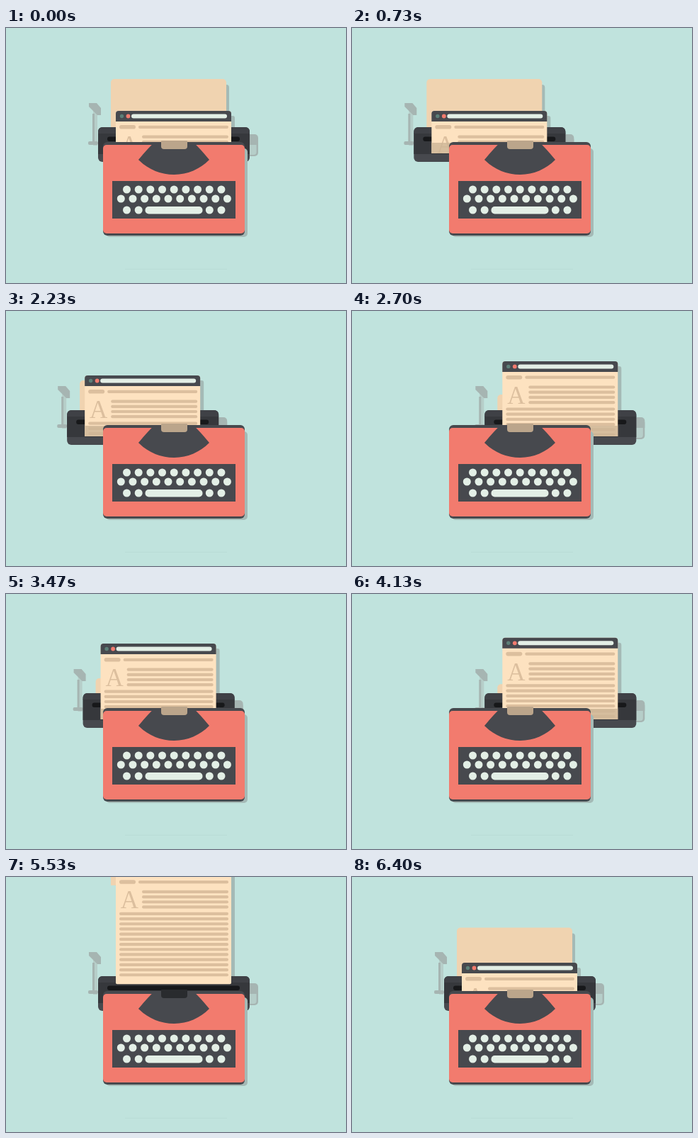
Animation of 480x360 px, one loop 6430 ms. Source, as an HTML page with a canvas:

```html
<!DOCTYPE html>
<html lang="en">
<head>
<meta charset="utf-8">
<title>Typewriter</title>
<style>
  html, body { margin: 0; width: 100%; height: 100%; overflow: hidden; background: #c0e3dd; }
  canvas { display: block; width: 480px; height: 360px; }
</style>
</head>
<body>
<canvas id="stage"></canvas>
<script>
const LOOP = 6430;
const REACH = 57.3;      // carriage travel to each side
const SHEET = 167;       // sheet height
const COL = {
  bg: '#c0e3dd', shadow: '#a4bab6', dark: '#47494e', deep: '#36383c',
  slot: '#17181a', red: '#f27b6e', key: '#e3efe6', front: '#fde2c0',
  back: '#f0d3b0', ink: '#dcbf9e', shade: '#cdb697', clip: '#bba58b',
  steel: '#a6b5b2', pale: '#b6cec9'
};

const canvas = document.getElementById('stage');
const ctx = canvas.getContext('2d');
const dpr = window.devicePixelRatio || 1;
canvas.width = 480 * dpr;
canvas.height = 360 * dpr;

const clamp = v => Math.max(0, Math.min(1, v));
const part = (t, a, b) => clamp((t - a) / (b - a));
const sine = u => 0.5 - 0.5 * Math.cos(Math.PI * u);
const lerp = (a, b, u) => a + (b - a) * u;

// Key strokes push the carriage along in soft steps.
function strokes(u, n) {
  const s = u * n;
  return (s - 0.09 * Math.sin(2 * Math.PI * s)) / n;
}

// start, end, from, to, number of strokes (0 = carriage return)
const MOVES = [
  [170, 930, 0, -REACH, 4],
  [930, 1190, -REACH, REACH, 0],
  [1281, 2348, REACH, -REACH, 8],
  [2348, 2610, -REACH, REACH, 0],
  [2738, 3805, REACH, -REACH, 8],
  [3805, 4080, -REACH, REACH, 0],
  [4200, 5030, REACH, 0, 4]
];

function carriageX(t) {
  let x = 0;
  for (const [a, b, from, to, n] of MOVES) {
    if (t < a) break;
    const u = part(t, a, b);
    x = lerp(from, to, n ? strokes(u, n) : sine(u));
  }
  return x;
}

// Top of the front sheet while lines are typed.
function feedY(t) {
  return 117 - 26 * sine(part(t, 1170, 1280))
             - 21 * sine(part(t, 2610, 2715))
             - 21 * sine(part(t, 4085, 4192));
}

function rect(x, y, w, h, r, fill) {
  ctx.fillStyle = fill;
  ctx.beginPath();
  ctx.roundRect(x, y, w, h, r);
  ctx.fill();
}

function poly(points, fill) {
  ctx.fillStyle = fill;
  ctx.beginPath();
  points.forEach(([x, y]) => ctx.lineTo(x, y));
  ctx.closePath();
  ctx.fill();
}

function dot(x, y, r, fill) {
  ctx.fillStyle = fill;
  ctx.beginPath();
  ctx.arc(x, y, r, 0, 7);
  ctx.fill();
}

function backSheet(y) {
  const h = Math.min(SHEET, 160 - y);
  if (h <= 0) return;
  rect(152, y + 8, 163, Math.max(0, h - 8), 4, COL.shadow);
  rect(148, y, 163, h, [5, 5, 0, 0], COL.back);
}

function lever() {
  rect(123, 112, 6, 54, 0, COL.pale);
  rect(122, 121, 3, 43, 0, COL.steel);
  poly([[117, 106], [128, 106], [134, 113], [134, 123], [129, 123], [117, 111]], COL.steel);
  rect(116, 160, 14, 5, 2, COL.steel);
}

function knob() {
  rect(340, 150, 16, 31, 5, COL.steel);
  rect(340, 153, 13.5, 26, 4, COL.pale);
  poly([[342, 150], [350, 150], [356, 157], [356, 165], [342, 165]], COL.steel);
}

function carriage() {
  rect(130, 140, 214, 49, 6, COL.dark);
  rect(130, 148, 214, 30, 0, COL.deep);
  rect(130, 140, 214, 9, [6, 6, 0, 0], '#3f4146');
  rect(143, 153.5, 187, 6.5, 3, COL.slot);
}

function frontSheet(y) {
  if (y > 177 || y + SHEET < 0) return;
  const line = (x, dy, w) => rect(x, y + dy - 2.1, w, 4.2, 2, COL.ink);
  ctx.save();
  ctx.beginPath();
  ctx.rect(140, 0, 200, 177);
  ctx.clip();

  ctx.save();
  ctx.beginPath();
  ctx.rect(140, 0, 200, 140);
  ctx.clip();
  rect(160, y + 7, 163, SHEET - 7, 3, COL.shadow);
  ctx.restore();

  rect(155, y, 163, SHEET, [4, 4, 2, 2], COL.front);
  rect(155, y, 163, 15, [4, 4, 0, 0], COL.dark);
  dot(163.5, y + 7.5, 2.7, '#5d8078');
  dot(172.5, y + 7.5, 2.9, COL.red);
  rect(177, y + 4.5, 135, 6, 3, COL.key);

  rect(160, y + 20, 23, 5.6, 2.8, COL.ink);
  line(187, 22.8, 127);
  for (let i = 0; i < 4; i++) line(192, 36.6 + i * 7.2, 122);
  for (let i = 0; i < 13; i++) line(160, 67.6 + i * 7.2, 154);
  ctx.fillStyle = COL.ink;
  ctx.font = '35px "Liberation Serif", "Times New Roman", serif';
  ctx.textAlign = 'center';
  ctx.fillText('A', 174.5, y + 60);

  if (y + SHEET > 162) {
    ctx.globalAlpha = 0.8;
    rect(155, Math.max(162, y), 163, 15, 0, COL.shade);
  }
  ctx.restore();
}

function body(hasPaper) {
  rect(141, 170, 200, 125, 5, COL.shadow);
  rect(137, 161, 200, 132, 6, COL.dark);
  rect(137, 165, 200, 125, 5, COL.red);

  ctx.fillStyle = COL.dark;
  ctx.beginPath();
  ctx.moveTo(209, 162);
  ctx.lineTo(265, 162);
  ctx.quadraticCurveTo(273, 169, 287, 186);
  ctx.arc(237, 137, 70, Math.atan2(49, 50), Math.atan2(49, -50));
  ctx.quadraticCurveTo(201, 169, 209, 162);
  ctx.fill();
  rect(219, 159, 37, 12, [1, 1, 4, 4], hasPaper ? COL.clip : '#292b2e');

  rect(150, 216, 174, 53, 0, COL.dark);
  const keys = (x, y, n) => {
    for (let i = 0; i < n; i++) dot(x + i * 16.68, y, 5.5, COL.key);
  };
  keys(170.5, 228, 9);
  keys(162.3, 241, 10);
  keys(170.5, 257, 2);
  keys(287.3, 257, 2);
  rect(196.5, 252, 81, 10.5, 5, COL.key);
}

function draw(t) {
  ctx.setTransform(dpr, 0, 0, dpr, 0, 0);
  ctx.fillStyle = COL.bg;
  ctx.fillRect(0, 0, 480, 360);
  rect(168, 340, 144, 1, 0, '#b9dcd6');

  const swap = t >= 5400;
  let frontY = feedY(t);
  let backY = 189 - frontY;
  if (swap) {
    // The finished page flies out while a fresh one drops in behind.
    backY = lerp(-161, 72, sine(part(t, 5430, 6430)));
    frontY = t < 6020
      ? 49 - 64 * Math.pow(Math.max(0, t - 5400) / 130, 1.5)
      : lerp(172, 117, part(t, 6030, 6430));
  }
  const hasPaper = frontY < 168 && frontY + SHEET > 165;

  ctx.save();
  ctx.translate(carriageX(t), 0);
  lever();
  knob();
  backSheet(backY);
  carriage();
  frontSheet(frontY);
  ctx.restore();
  body(hasPaper);
}

const start = performance.now();
function tick() {
  draw((performance.now() - start) % LOOP);
  requestAnimationFrame(tick);
}
tick();
</script>
</body>
</html>
```
